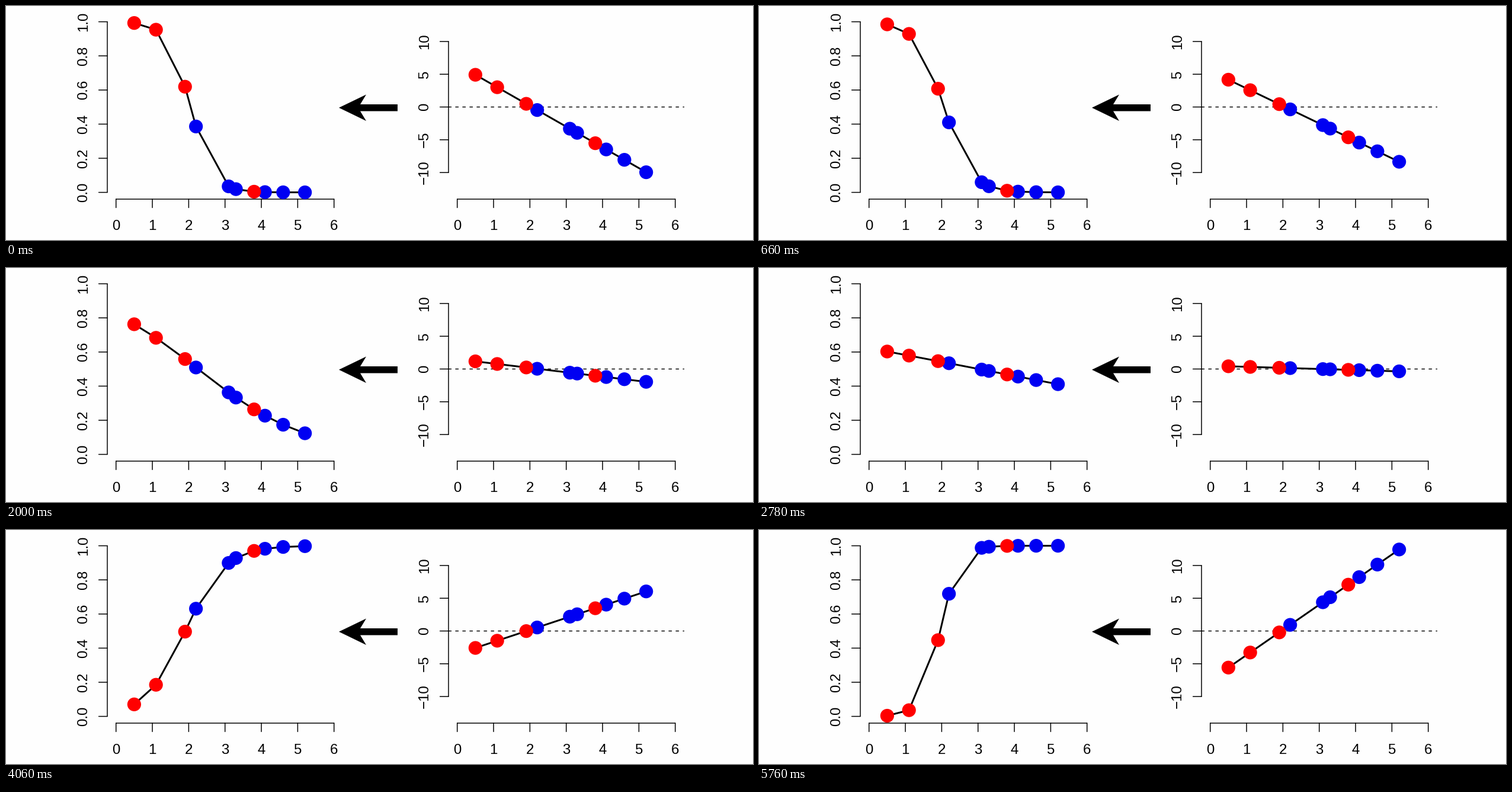
These frames come from a looping animation (1261x395 px, 6180 ms). A matplotlib script:

```python
import numpy as np
import matplotlib.pyplot as plt
from matplotlib.animation import FuncAnimation
from matplotlib.collections import LineCollection

W, H, DPI = 1261, 395, 64
STEP, LOOP = 20, 6180
PT = 72 / DPI            # points per pixel
UNIT_X = 368 / 6         # pixels per unit of x
FLOOR, TICK = 326, 14.4  # height of the x axis, tick length
THIN = 1.5 * PT

plt.rcParams["font.family"] = "Liberation Sans"
fig = plt.figure(figsize=(W / DPI, H / DPI), dpi=DPI, facecolor="#fefefe")
ax = fig.add_axes([0, 0, 1, 1])
ax.set_xlim(0, W)
ax.set_ylim(H, 0)
ax.axis("off")

# blue points first, so that the red ones lie on top
blue_x = [2.2, 3.1, 3.3, 4.1, 4.6, 5.2]
red_x = [0.5, 1.1, 1.9, 3.8]
x = np.array(blue_x + red_x)
colors = ["#0000f2"] * len(blue_x) + ["#ff0000"] * len(red_x)
order = np.argsort(x)


def label(px, py, text, rotation=0):
    ax.text(px, py, text, fontsize=24 * PT, rotation=rotation,
            ha="center", va="baseline", rotation_mode="anchor")


class Panel:
    def __init__(self, spine, zero, unit, ticks, fmt):
        self.zero, self.unit = zero, unit
        left = spine + 0.24 * UNIT_X
        self.px = left + x * UNIT_X
        xs = left + np.arange(7) * UNIT_X
        ys = zero - np.asarray(ticks) * unit

        segs = [[(spine, ys[0]), (spine, ys[-1])],
                [(xs[0], FLOOR), (xs[-1], FLOOR)]]
        segs += [[(spine - TICK, y), (spine, y)] for y in ys]
        segs += [[(v, FLOOR), (v, FLOOR + TICK)] for v in xs]
        ax.add_collection(LineCollection(
            segs, colors="black", linewidths=THIN, capstyle="round",
            snap=False))

        for i, v in enumerate(xs):
            label(v, 378, str(i))
        for t, y in zip(ticks, ys):
            label(spine - 34, y, fmt(t).replace("-", "\u2212"), 90)

        self.curve, = ax.plot([], [], color="black", lw=3 * PT, zorder=3)
        self.dots = ax.scatter(self.px, self.px, s=(23.2 * PT) ** 2,
                               c=colors, linewidths=0, zorder=4)

    def show(self, values):
        py = self.zero - values * self.unit
        self.curve.set_data(self.px[order], py[order])
        self.dots.set_offsets(np.column_stack([self.px, py]))


prob = Panel(171, 314.6, 288, np.arange(6) / 5, "{:.1f}".format)
odds = Panel(747, 170.5, 11.06, range(-10, 11, 5), str)

ax.plot([747, 1144.4], [170.5, 170.5], color="black", lw=THIN,
        dashes=(3, 5), dash_capstyle="round", snap=False, zorder=1)
ax.fill([562, 608, 598, 661, 661, 598, 608],
        [171.7, 149.5, 166, 166, 177.5, 177.5, 194], color="black", lw=0)
ax.set_xlim(0, W)
ax.set_ylim(H, 0)


def update(frame):
    # the line tilts in equal jumps whose pace slows a little
    turn = np.interp(frame * STEP, [0, 1960, 3200, 5760], [0, 5, 8, 14])
    a = 6.5 - np.floor(turn + 1e-9)
    line = a + (0.085 - a / 2) * x
    odds.show(line)
    prob.show(1 / (1 + np.exp(-line)))
    return []


anim = FuncAnimation(fig, update, frames=LOOP // STEP, interval=STEP,
                     repeat=True, repeat_delay=0)
plt.show()
```
